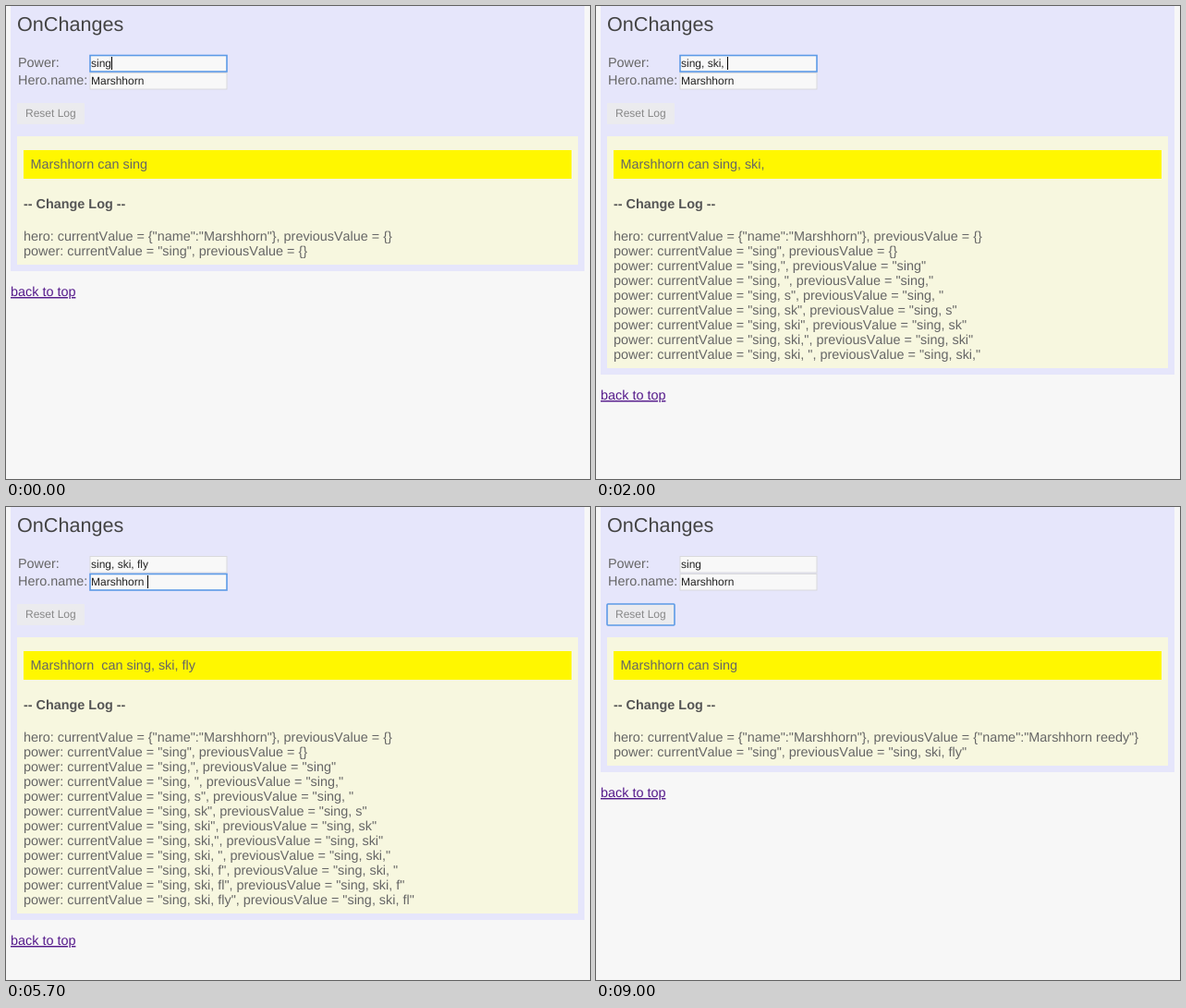
Write an HTML page that moves like this. It is 632x512 px and loops after 9.7 s.

```html
<!DOCTYPE html>
<html lang="en">
<head>
<meta charset="utf-8">
<title>OnChanges</title>
<style>
html, body { margin: 0; width: 632px; height: 512px; overflow: hidden; background: #f7f7f7; }
svg { display: block; }
text {
  font: 14.4px "Liberation Sans", Arial, sans-serif;
  font-kerning: none; text-rendering: geometricPrecision;
  white-space: pre; fill: #666;
}
.small { font-size: 12px; fill: #222; }
.field { fill: #f8f8f8; stroke: #d9d9dc; }
.focus { stroke: #5c9ae6; stroke-width: 1.6; }
</style>
</head>
<body>
<svg width="632" height="512">
  <rect id="panel" x="5" width="621" fill="#e6e6fb"/>
  <text x="12" y="27" style="font-size:21.6px;fill:#444">OnChanges</text>
  <text x="13" y="66">Power:</text>
  <text x="13" y="85">Hero.name:</text>
  <rect id="powerBox" class="field" x="91" y="53.5" width="148" height="17.5"/>
  <rect id="nameBox" class="field" x="91" y="72.5" width="148" height="17.5"/>
  <rect id="selection" x="92" y="74" width="57" height="14" fill="#3390ff"/>
  <text id="power" class="small" x="92" y="66"/>
  <text id="name" class="small" x="92" y="85"/>
  <rect id="caret" width="1" height="14" fill="#000"/>
  <rect id="button" x="12" y="105" width="73" height="23" rx="1" fill="#ebebee"/>
  <text class="small" x="21" y="120" style="fill:#888">Reset Log</text>
  <rect id="sheet" x="12" y="141" width="607" fill="#f7f7df"/>
  <rect x="19" y="156" width="593" height="31" fill="#fff700"/>
  <text id="summary" x="26.5" y="176"/>
  <text x="19" y="219" style="font-weight:bold;fill:#555">-- Change Log --</text>
  <g id="log"></g>
  <text id="link" x="5" style="fill:#551a8b;text-decoration:underline">back to top</text>
  <path id="pointer" d="M.5 .5V33L8 26.5L13 37.5L18.5 35.5L14 24.5H24.5Z" fill="#fff" stroke="#000" stroke-width="1.2"/>
</svg>
<script>
const LOOP = 9700, FOCUS_NAME = 4200, DESELECT = 5200, RESET = 8700;
const POWER = "sing", MORE = ", ski, fly", HERO = "Marshhorn", SUFFIX = " reedy";

// Key times: the field shows a letter first, the bound view may follow later
const powerKeys = [700, 1000, 1100, 1200, 1400, 1700, 2000, 2200, 2500, 2700];
const powerSeen = [900, 1000, 1100, 1200, 1400, 1900, 2000, 2400, 2500, 2700];
const nameKeys = [5600, 5900, 6100, 6300, 6400, 6500];
const nameSeen = [5700, 5900, 6200, 6300, 6500, 6700];
const caretOff = [[500, 700], [1500, 1700], [3000, 3700], [FOCUS_NAME, DESELECT],
  [7000, 7600], [8100, 8500], [RESET, LOOP]];

const $ = id => document.getElementById(id);
const set = (id, attrs) => { for (const k in attrs) $(id).setAttribute(k, attrs[k]); };
const show = (id, on) => { $(id).style.display = on ? "" : "none"; };
const within = (t, [a, b]) => t >= a && t < b;
const typed = (base, extra, times, t) =>
  base + extra.slice(0, times.filter(k => k <= t).length);
const change = (key, now, before) => `${key}: currentValue = ${now}, previousValue = ${before}`;
const quote = s => `"${s}"`;
const hero = s => JSON.stringify({ name: s });

const rows = Array.from({ length: MORE.length + 2 }, (_, i) => {
  const row = document.createElementNS("http://www.w3.org/2000/svg", "text");
  row.setAttribute("x", 19);
  row.setAttribute("y", 254 + 16 * i);
  return $("log").appendChild(row);
});

function logLines(power, reset) {
  if (reset) return [
    change("hero", hero(HERO), hero(HERO + SUFFIX)),
    change("power", quote(POWER), quote(POWER + MORE))
  ];
  const lines = [change("hero", hero(HERO), "{}"), change("power", quote(POWER), "{}")];
  for (let n = POWER.length + 1; n <= power.length; n++)
    lines.push(change("power", quote(power.slice(0, n)), quote(power.slice(0, n - 1))));
  return lines;
}

function draw(t) {
  const reset = t >= RESET, onName = t >= FOCUS_NAME && !reset;
  const selected = within(t, [FOCUS_NAME, DESELECT]);
  const value = (base, extra, times) => reset ? base : typed(base, extra, times, t);
  const power = value(POWER, MORE, powerSeen);

  $("power").textContent = value(POWER, MORE, powerKeys);
  $("name").textContent = value(HERO, SUFFIX, nameKeys);
  $("name").style.fill = selected ? "#fff" : "";
  $("summary").textContent = value(HERO, SUFFIX, nameSeen) + " can " + power;

  const lines = logLines(power, reset);
  rows.forEach((row, i) => { row.textContent = lines[i] || ""; });
  const grow = 16 * lines.length;
  set("panel", { height: 255 + grow });
  set("sheet", { height: 107 + grow });
  set("link", { y: 282 + grow });

  $("powerBox").classList.toggle("focus", t < FOCUS_NAME);
  $("nameBox").classList.toggle("focus", onName);
  set("button", { stroke: reset ? "#5c9ae6" : "none", "stroke-width": 1.6 });
  show("selection", selected);

  show("caret", !caretOff.some(span => within(t, span)));
  const field = $(onName ? "name" : "power");
  set("caret", { x: Math.round(92 + field.getComputedTextLength()), y: onName ? 74 : 55 });

  // The pointer fades in on the button, then leaves to the left
  show("pointer", within(t, [8100, 9000]));
  const x = 52 - 26 * Math.max(0, Math.floor((t - 8600) / 100));
  set("pointer", {
    transform: `translate(${x} 105)`,
    opacity: t < 8500 ? Math.min(.75, .25 * Math.floor((t - 8000) / 100)) : 1
  });
}

function tick() {
  draw(performance.now() % LOOP);
  requestAnimationFrame(tick);
}
tick();
</script>
</body>
</html>
```
